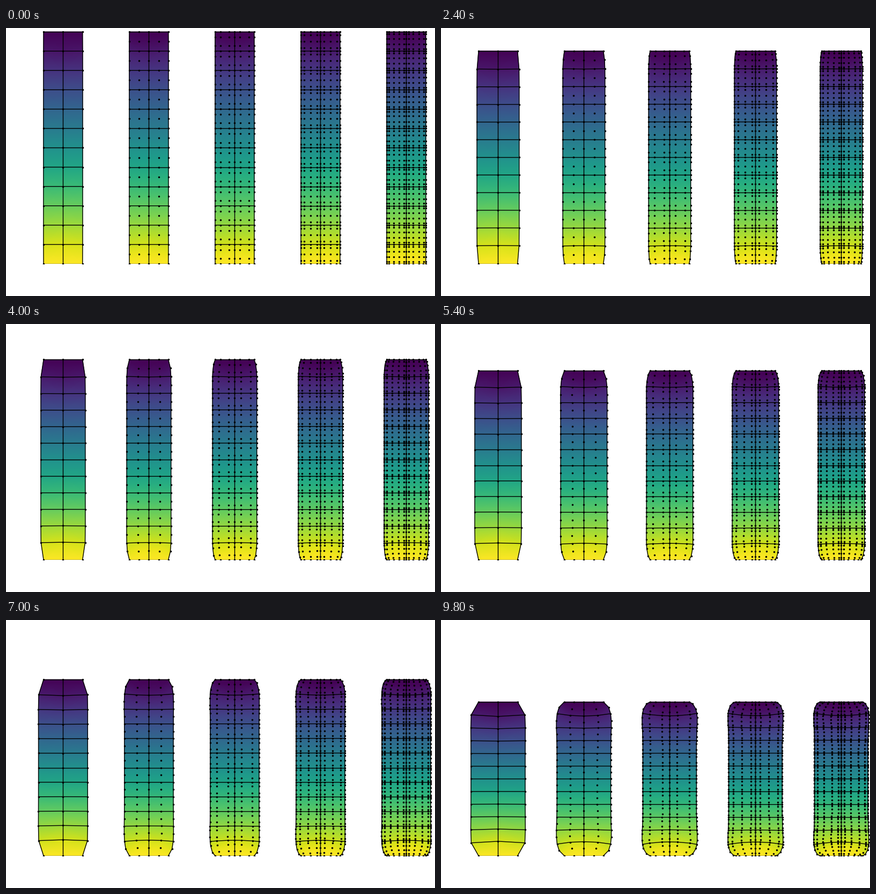
Write a matplotlib script that moves like this. It is 800 px wide and 500 px high and loops after 10000 ms.

```python
"""Compression of a clamped rubber block, solved with Lagrange elements of order 1 to 5."""
import numpy as np
from numpy.polynomial import legendre as leg
import matplotlib.pyplot as plt
from matplotlib.animation import FuncAnimation

FRAMES, INTERVAL = 50, 200
UNIT = 436 / 12              # element size in pixels
STEP = 2.975 / UNIT          # shortening per frame, in element sizes
HALF = 6                     # element rows in the upper half
MU, BULK = 1.0, 10.0
EYE = np.eye(2)


def lobatto(p):
    inner = np.sort(leg.Legendre.basis(p).deriv().roots().real)
    return np.concatenate(([-1.0], inner, [1.0]))


def neo_hooke(F):
    """First Piola-Kirchhoff stress and its tangent in plane strain."""
    J = np.linalg.det(F)
    T = np.swapaxes(np.linalg.inv(F), -1, -2)
    I1 = (F * F).sum((-1, -2)) + 1

    def outer(A, B):
        return A[..., :, :, None, None] * B[..., None, None, :, :]

    def wide(s):
        return s[..., None, None, None, None]

    TT = outer(T, T)
    swapped = np.einsum("...il,...kj->...ijkl", T, T)
    m = MU * J ** (-2 / 3)
    P = (m[..., None, None] * (F - I1[..., None, None] / 3 * T)
         + (BULK * (J - 1) * J)[..., None, None] * T)
    A = wide(m) * (np.einsum("ik,jl->ijkl", EYE, EYE)
                   - 2 / 3 * (outer(F, T) + outer(T, F))
                   + wide(2 / 9 * I1) * TT + wide(I1 / 3) * swapped)
    A += BULK * (wide((2 * J - 1) * J) * TT - wide((J - 1) * J) * swapped)
    return P, A


def solve(p):
    """Quarter model: reference grid and its displacements for every frame."""
    z = lobatto(p)
    q, w = leg.leggauss(p + 1)
    inv = np.linalg.inv(leg.legvander(z, p))
    N = leg.legvander(q, p) @ inv
    dN = 2 * leg.legval(q, leg.legder(np.eye(p + 1))).T @ inv
    G = np.stack([np.kron(N, dN), np.kron(dN, N)], axis=-1)
    GW = G * (np.kron(w, w) / 4)[:, None, None]

    xs = (z + 1) / 2
    ys = np.concatenate([[0.0]] + [e + xs[1:] for e in range(HALF)])
    X, Y = np.meshgrid(xs, ys)
    ids = np.arange(X.size).reshape(X.shape)
    conn = np.array([ids[e * p:e * p + p + 1].ravel() for e in range(HALF)])
    dofs = (2 * conn[:, :, None] + np.arange(2)).reshape(HALF, -1)

    held = np.zeros(X.shape + (2,), bool)
    held[:, 0, 0] = held[0, :, 1] = True
    held[-1] = True
    free = np.flatnonzero(~held.ravel())

    u = np.zeros((X.size, 2))
    u[:, 1] = -STEP / 2 * Y.ravel() / HALF
    states = []
    for n in range(1, FRAMES + 1):
        if n > 1:
            u = u * n / (n - 1)
        for _ in range(12):
            F = EYE + np.einsum("eni,qnj->eqij", u[conn], G)
            P, A = neo_hooke(F)
            re = np.einsum("eqij,qnj->eni", P, GW, optimize=True)
            AG = np.einsum("eqijkl,qnj->eniqkl", A, GW)
            ke = np.einsum("eniqkl,qml->enimk", AG, G, optimize=True)
            r = np.zeros(u.size)
            K = np.zeros((u.size, u.size))
            for d, f, k in zip(dofs, re, ke):
                r[d] += f.ravel()
                K[np.ix_(d, d)] += k.reshape(d.size, d.size)
            du = np.linalg.solve(K[np.ix_(free, free)], -r[free])
            flat = u.ravel().copy()
            flat[free] += du
            u = flat.reshape(-1, 2)
            if np.abs(du).max() < 1e-5:
                break
        states.append(u.reshape(X.shape + (2,)))
    return X, Y, states


def unfold(a, sx, sy):
    """Mirror a quarter field to the whole block with the given signs."""
    a = np.hstack([sx * a[:, :0:-1], a])
    return np.vstack([sy * a[:0:-1], a])


models = {p: solve(p) for p in range(1, 6)}

fig = plt.figure(figsize=(8, 5), dpi=100, facecolor="white")
ax = fig.add_axes([0, 0.12, 1, 0.88])


def draw(n):
    ax.clear()
    ax.set_axis_off()
    ax.set(xlim=(0, 800), ylim=(0, 440))
    lift = STEP * (n + 1) / 2
    for p, (X, Y, states) in models.items():
        u = states[n]
        x = 106.4 + 160 * (p - 1) + UNIT * unfold(X + u[..., 0], -1, 1)
        y = UNIT * (HALF - lift + unfold(Y + u[..., 1], 1, -1))
        ax.pcolormesh(x, y, unfold(u[..., 1], 1, -1), shading="gouraud",
                      cmap="viridis", vmin=-lift, vmax=lift, zorder=1)
        ax.plot(x[::p].T, y[::p].T, color="black", lw=1, zorder=2)
        ax.plot(x[:, ::p], y[:, ::p], color="black", lw=1, zorder=2)
        ax.plot(x.ravel(), y.ravel(), "o", color="black", ms=1.5, mew=1, zorder=3)
    return []


anim = FuncAnimation(fig, draw, frames=FRAMES, interval=INTERVAL,
                     init_func=lambda: [], repeat=True, repeat_delay=0)
plt.show()
```
